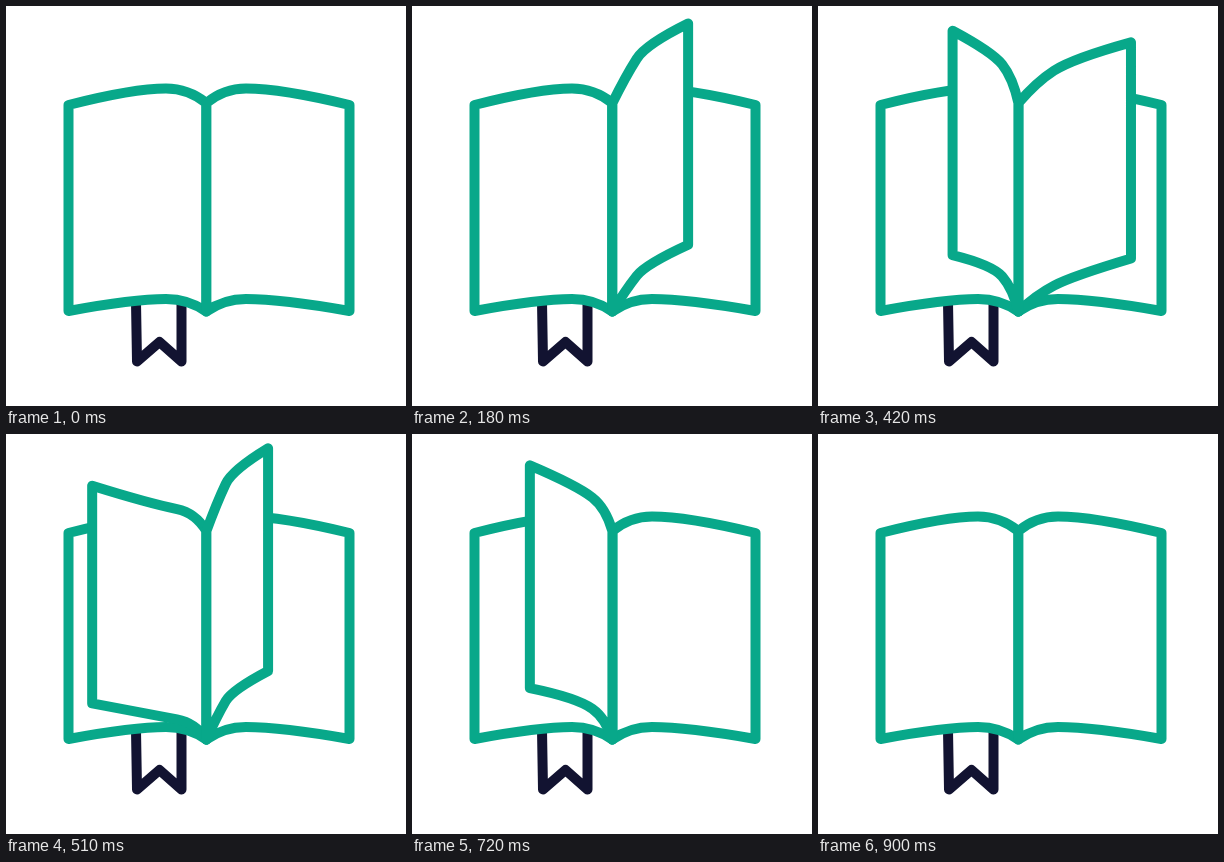
An HTML page with a canvas that plays this animation: 400x400 px, repeating every 2.93 s.

```html
<!DOCTYPE html>
<html lang="en">
<head>
<meta charset="utf-8">
<title>Book</title>
<style>
html, body { margin: 0; width: 100%; height: 100%; overflow: hidden; background: #fff; }
canvas { display: block; width: 400px; height: 400px; }
</style>
</head>
<body>
<canvas id="stage" width="400" height="400"></canvas>
<script>
const ctx = document.getElementById('stage').getContext('2d');
const GREEN = '#08a88a', NAVY = '#121331';
const LOOP = 2930, STEP = 30, FLIP = 608;
const SPINE = { x: 200.4, top: 97, bottom: 305.5 };

// sway bends the otherwise even turning speed
const FLIPS = [{ start: 0, sway: 0.031 }, { start: 290, sway: 0 }];

// angle 0 lies flat on the right, PI flat on the left
function drawPage(angle) {
  const c = Math.cos(angle), s = Math.sin(angle), s2 = Math.sin(2 * angle);
  const early = Math.max(0, s2);

  const edge = {
    x: 203 + 140.5 * c,
    top: 99 - 85 * s - 10 * early,
    bottom: 305 - 64 * s - 13 * early
  };
  // The paper curves through a knee near the spine
  const knee = {
    x: 200 + 40 * c + 5 * s2 * s2,
    rise: 14.5 + 36 * s * s + 4 * s2
  };
  const dx = 22 * c, dy = 21 * s * s + 3 * s2;
  const reach = 0.65 * Math.hypot(edge.x - knee.x, SPINE.top - knee.rise - edge.top)
    / Math.hypot(knee.x - SPINE.x, knee.rise);
  const bend = 0.86 - 0.06 * s2;

  const inner = { x: knee.x - dx, rise: knee.rise - dy };
  const outer = { x: knee.x + dx * reach, rise: knee.rise + dy * reach };
  const high = p => [p.x, SPINE.top - p.rise];
  const low = p => [p.x, SPINE.bottom - p.rise * bend];

  ctx.beginPath();
  ctx.moveTo(SPINE.x, SPINE.top);
  ctx.quadraticCurveTo(...high(inner), ...high(knee));
  ctx.quadraticCurveTo(...high(outer), edge.x, edge.top);
  ctx.lineTo(edge.x, edge.bottom);
  ctx.quadraticCurveTo(...low(outer), ...low(knee));
  ctx.quadraticCurveTo(...low(inner), SPINE.x, SPINE.bottom);
  ctx.closePath();
  ctx.fillStyle = '#fff';
  ctx.fill();
  ctx.strokeStyle = GREEN;
  ctx.stroke();
}

function drawBookmark() {
  ctx.beginPath();
  ctx.moveTo(130, 296);
  ctx.lineTo(131, 355.5);
  ctx.lineTo(153.5, 336);
  ctx.lineTo(175.5, 355.5);
  ctx.lineTo(175.5, 296);
  ctx.strokeStyle = NAVY;
  ctx.stroke();
}

function draw(time) {
  const t = Math.floor(time % LOOP / STEP) * STEP;
  ctx.fillStyle = '#fff';
  ctx.fillRect(0, 0, 400, 400);
  ctx.lineWidth = 10;
  ctx.lineJoin = ctx.lineCap = 'round';
  drawBookmark();
  drawPage(Math.PI);
  drawPage(0);

  const angles = [];
  for (const { start, sway } of FLIPS) {
    const u = (t - start) / FLIP;
    if (u > 0 && u < 1) angles.push(Math.PI * (u + sway * Math.sin(2 * Math.PI * u)));
  }
  // The page closest to upright lies on top
  angles.sort((a, b) => Math.abs(Math.cos(b)) - Math.abs(Math.cos(a)));
  angles.forEach(drawPage);
}

const begin = performance.now();
function tick() {
  draw(performance.now() - begin);
  requestAnimationFrame(tick);
}
tick();
</script>
</body>
</html>
```
